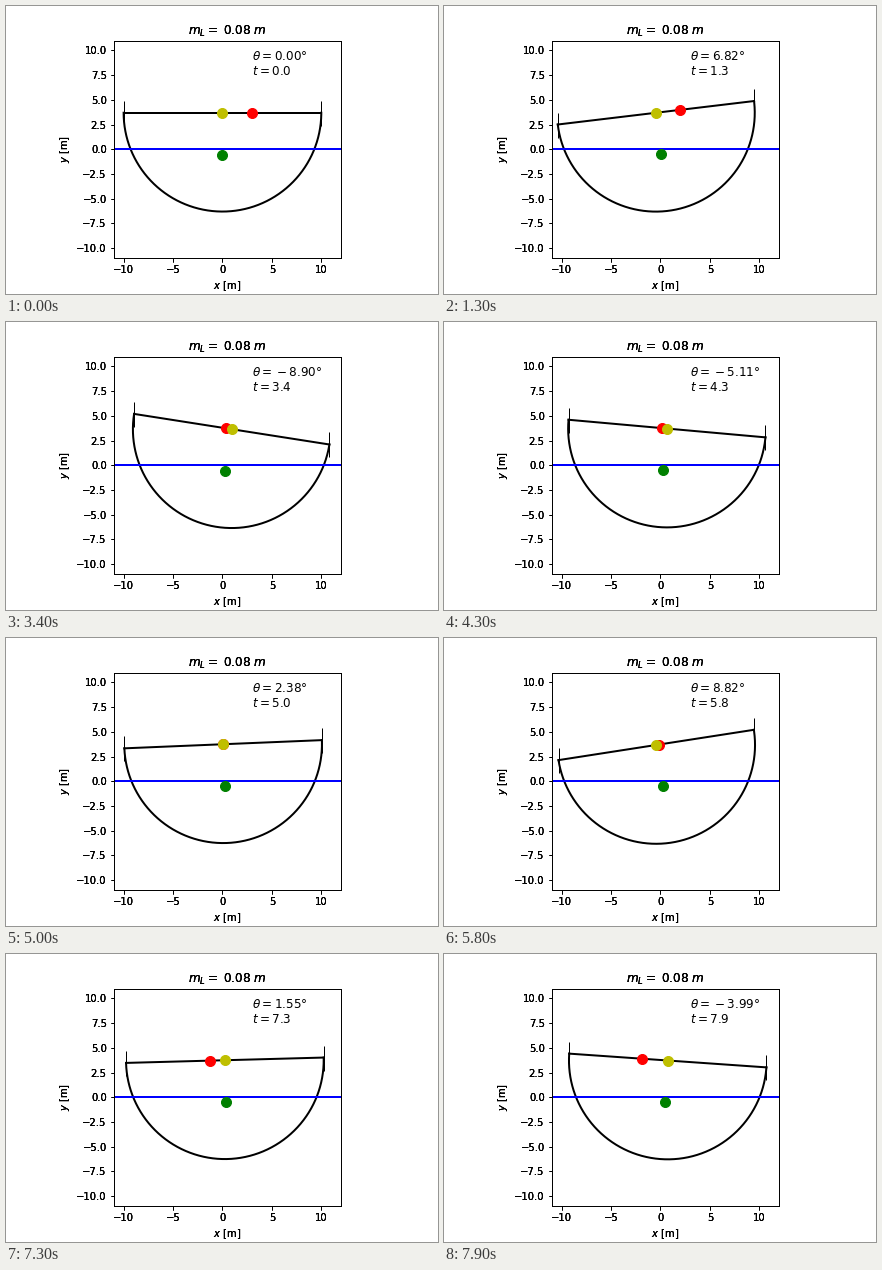
A matplotlib script that plays this animation: 432x288 px, repeating every 8000 ms.

```python
import numpy as np
import matplotlib.pyplot as plt
from matplotlib.animation import FuncAnimation

# Half-disc ship with a load sliding without friction on its deck
R, G = 10.0, 9.81
RHO_SHIP, RHO_WATER = 500.0, 1000.0
M = 0.5 * np.pi * R**2 * RHO_SHIP
ML = 0.08 * M
H = 4 * R / (3 * np.pi)                      # deck centre to centre of mass
INERTIA = M * R**2 * (0.5 - 16 / (9 * np.pi**2))
FRAMES, STEP, SUB = 80, 0.1, 10


def segment(angle):
    return 0.5 * R**2 * (angle - np.sin(angle))


def rest_height():
    """Height of the deck centre above the water in equilibrium."""
    lo, hi = 0.0, np.pi
    for _ in range(60):
        mid = (lo + hi) / 2
        if RHO_WATER * segment(mid) < M + ML:
            lo = mid
        else:
            hi = mid
    return R * np.cos(lo / 2)


def rates(u):
    x, y, th, s, vx, vy, om, vs = u
    deck = y + H * np.cos(th)
    lift = RHO_WATER * G * segment(2 * np.arccos(deck / R))
    push = ML * G * np.cos(th)
    return np.array([
        vx, vy, om, vs,
        push * np.sin(th) / M,
        (lift - M * G - push * np.cos(th)) / M,
        (-lift * H * np.sin(th) - push * s) / INERTIA,
        -G * np.sin(th),
    ])


def simulate():
    u = np.array([0, rest_height() - H, 0, 3.0, 0, 0, 0.2, 0])
    dt = STEP / SUB
    states = [u]
    for _ in range(FRAMES - 1):
        for _ in range(SUB):
            k1 = rates(u)
            k2 = rates(u + dt / 2 * k1)
            k3 = rates(u + dt / 2 * k2)
            k4 = rates(u + dt * k3)
            u = u + dt / 6 * (k1 + 2 * k2 + 2 * k3 + k4)
        states.append(u)
    return states


STATES = simulate()

plt.rcParams["font.family"] = "DejaVu Sans"
plt.rcParams["font.size"] = 10
fig = plt.figure(figsize=(6, 4), dpi=72, facecolor="white")
fig.subplots_adjust(left=0.125, right=0.9, bottom=0.125, top=0.88)


def make_axes(background):
    ax = fig.add_subplot(111)
    ax.patch.set_visible(background)
    ax.set_aspect("equal")
    ax.set_xlim(-11, 12)
    ax.set_ylim(-11, 11)
    ax.set_xlabel("$x$ [m]")
    ax.set_ylabel("$y$ [m]")
    ax.set_title("$m_L=$ 0.08 $m$", fontsize=12)
    return ax


ax = make_axes(True)
for _ in range(2):                           # overprint to darken the lettering
    make_axes(False)

hull, = ax.plot([], [], "k", lw=2)
deck, = ax.plot([], [], "k", lw=2, marker="|", ms=25, mew=1)
ax.axhline(0, color="b", lw=2)
mass, = ax.plot([], [], "o", color="g", ms=10)
load, = ax.plot([], [], "o", color="r", ms=10)
mid, = ax.plot([], [], "o", color="y", ms=10)
angle_text = ax.text(3, 9, "", fontsize=12)
time_text = ax.text(3, 7.5, "", fontsize=12)

ARC = np.linspace(np.pi, 2 * np.pi, 200)


def update(i):
    x, y, th, s = STATES[i][:4]
    c, sn = np.cos(th), np.sin(th)
    mx, my = x - H * sn, y + H * c
    hull.set_data(mx + R * np.cos(ARC + th), my + R * np.sin(ARC + th))
    deck.set_data([mx - R * c, mx + R * c], [my - R * sn, my + R * sn])
    mass.set_data([x], [y])
    load.set_data([mx + s * c], [my + s * sn])
    mid.set_data([mx], [my])
    deg = np.degrees(th)
    sign = "{}-" if deg < 0 else ""
    angle_text.set_text(rf"$\theta = {sign}{abs(deg):.2f}$°")
    time_text.set_text(f"$t = {i * STEP:.1f}$")
    return hull, deck, mass, load, mid, angle_text, time_text


anim = FuncAnimation(fig, update, frames=FRAMES, interval=100,
                     repeat=True, repeat_delay=0, blit=False)
plt.show()
```
